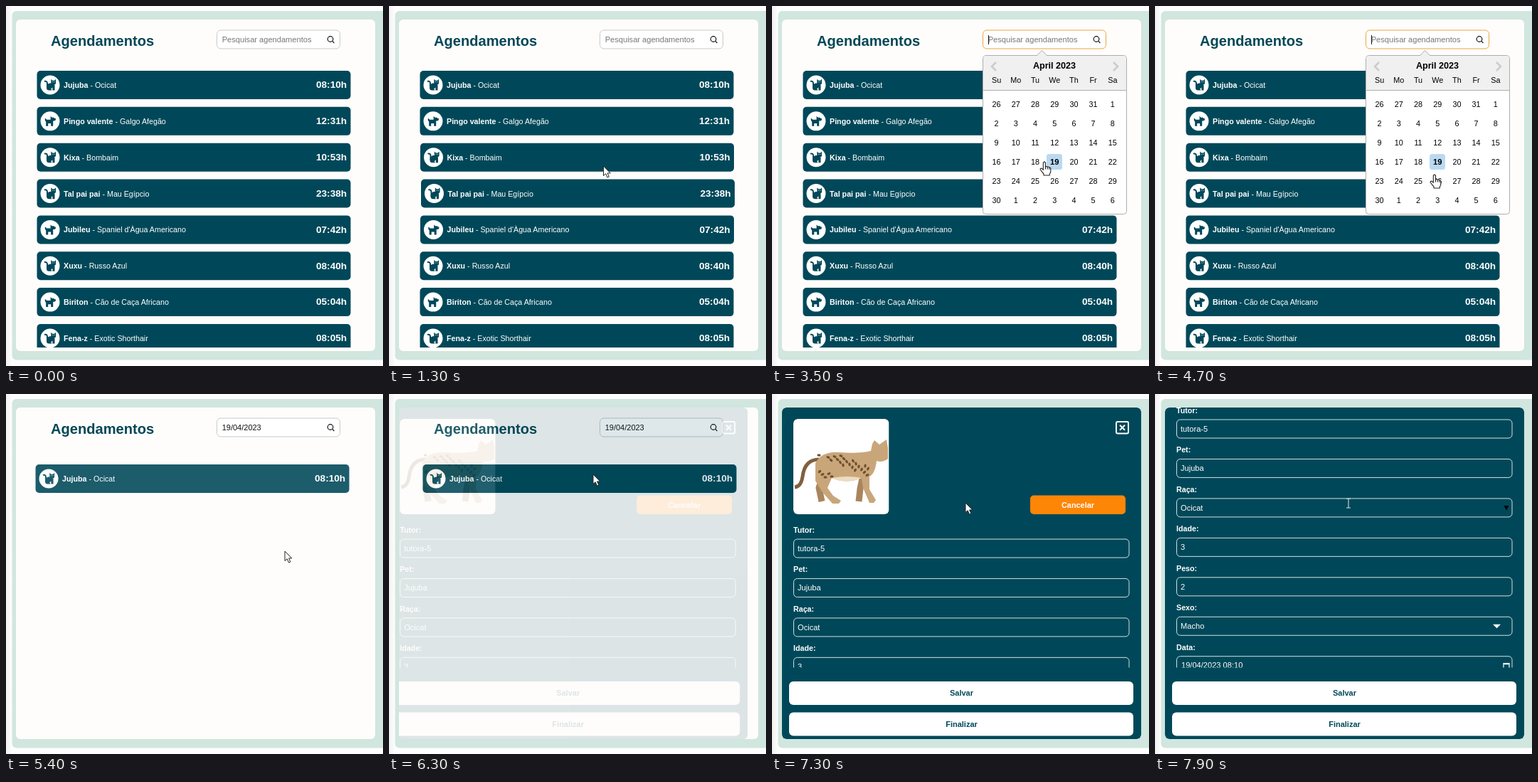
These frames come from a looping animation (530 by 506 pixels, 8000 ms). An HTML page:

```html
<!DOCTYPE html>
<html lang="pt">
<head>
<meta charset="utf-8">
<title>Agendamentos</title>
<style>
  html, body { margin: 0; width: 100%; height: 100%; overflow: hidden; background: #fefefe; }
  svg { display: block; width: 530px; height: 506px; font-family: "Liberation Sans", Arial, sans-serif; }
  .b { font-weight: bold; }
  .mid { text-anchor: middle; }
</style>
</head>
<body>
<svg id="stage" viewBox="0 0 530 506">
  <defs>
    <linearGradient id="edge">
      <stop offset="0" stop-color="#f1f1f1"/><stop offset="1" stop-color="#fdfdfd"/>
    </linearGradient>
    <clipPath id="panelClip"><rect x="14" y="19" width="505" height="466" rx="6"/></clipPath>
    <clipPath id="listClip"><rect x="14" y="70" width="505" height="410"/></clipPath>
    <clipPath id="formClip"><rect x="14" y="19" width="505" height="365.5"/></clipPath>
    <clipPath id="photoClip"><rect x="30" y="35" width="134.5" height="134" rx="6"/></clipPath>
    <g id="cat" fill="#004859">
      <path d="M-7.3-5.3Q-4-5.6-4-2V3" fill="none" stroke="#004859" stroke-width="2" stroke-linecap="round"/>
      <path d="M-5 4C-5-1.5-1-3.2 2.5-2.4L6.5 0V7.6H3.4V3.6L1 5.8Q2.3 6 2.3 7.6H-1.6Q-5 7.6-5 4Z"/>
      <path d="M1.3-8.3l2 2h2.8l2-2v5.4q0 2.7-3.4 2.7t-3.4-2.7z"/>
      <path d="M3.2-4.3h1M5.4-4.3h1" stroke="#fff" stroke-width=".9"/>
    </g>
    <path id="dog" fill="#004859" d="M-7.3-3.6q1.2-.5 1.6.6q.3 1 1.6 1H.6V-7l2 1.8h2.8l1 1.4h1.5v1.4q0 2-2.3 2H4.2V7H1.2V3.2H-2.8V7h-3V.8q-1.8-1-1.5-4.4z"/>
  </defs>

  <rect width="8" height="506" fill="url(#edge)"/>
  <rect x="8.500" y="7" width="540" height="490.500" rx="6" fill="#d0e6de"/>
  <rect x="14" y="19" width="505" height="466" rx="6" fill="#fefdfc"/>

  <text x="63" y="56" class="b" font-size="20.100" fill="#034756">Agendamentos</text>
  <rect id="box" x="296.500" y="34" width="173" height="26" rx="5.500" fill="#fff"/>
  <text id="query" x="303.700" y="51"/>
  <g fill="none" stroke="#111" stroke-width="1.200">
    <circle cx="456" cy="46.500" r="3.800"/><path d="M458.800 49.400l2.600 2.600"/>
  </g>
  <path id="caret" d="M304.500 41v13" stroke="#111"/>

  <g id="list" clip-path="url(#listClip)"></g>
  <g id="calendar"></g>

  <g clip-path="url(#panelClip)">
    <g id="modal">
      <rect x="14" y="19" width="505" height="466" rx="6" fill="#004859"/>
      <g clip-path="url(#formClip)"><g id="form"></g></g>
      <g id="actions"></g>
    </g>
  </g>

  <g id="cursor">
    <path id="arrow" d="M0 0V13.500L3.200 10.700L5.500 16L7.800 15L5.600 9.900H9.800Z" fill="#fff" stroke="#222" stroke-width="1"/>
    <path id="beam" d="M-3-6H-1Q0-6 0-5V6Q0 7-1 7H-3M3-6H1Q0-6 0-5M0 6Q0 7 1 7H3" fill="none" stroke="#333" stroke-width="1.100"/>
    <path id="hand" d="M-1.700 1.300Q0-1 1.500 1.300V7Q3 5.700 4.300 7.300Q5.800 6.300 6.800 8Q8.600 7.400 8.800 9.500V14Q8.200 16 7.300 17V19H-1V17Q-4 13.800-6 10.500Q-5.500 8.300-3.300 9.700L-1.700 11.300ZM1.500 7v3.500M4.300 7.500v3M6.800 8.300v2.500" fill="#fff" stroke="#222" stroke-width="1.100" stroke-linejoin="round"/>
  </g>
</svg>

<script>
const LOOP = 8000, STEP = 100;
const OPEN = 2500, PICK = 5100, MODAL = 6240, SCROLL = 7400;
const TEAL = '#004859', FADE = 500, SLIDE = 17;
const $ = id => document.getElementById(id);
const show = (el, on) => el.setAttribute('visibility', on ? 'visible' : 'hidden');

const text = (x, y, s, size, fill, cls = '') =>
  `<text x="${x}" y="${y}" font-size="${size}" fill="${fill}" class="${cls}">${s}</text>`;
const rect = (x, y, w, h, r, attrs) =>
  `<rect x="${x}" y="${y}" width="${w}" height="${h}" rx="${r}" ${attrs}/>`;

// Appointment list
const pets = [
  ['cat', 'Jujuba', 'Ocicat', '08:10h'],
  ['dog', 'Pingo valente', 'Galgo Afegão', '12:31h'],
  ['cat', 'Kixa', 'Bombaim', '10:53h'],
  ['cat', 'Tal pai pai', 'Mau Egípcio', '23:38h'],
  ['dog', 'Jubileu', "Spaniel d'Àgua Americano", '07:42h'],
  ['cat', 'Xuxu', 'Russo Azul', '08:40h'],
  ['dog', 'Biriton', 'Cão de Caça Africano', '05:04h'],
  ['cat', 'Fena-z', 'Exotic Shorthair', '08:05h']
];
const rowTop = (i, t) => t < PICK ? 91 + i * 50.85 : 99;

$('list').innerHTML = pets.map(([icon, name, breed, hour]) => `<g>
  ${rect(43.5, 0, 441, 40, 5, `fill="${TEAL}"`)}
  <circle cx="62" cy="20" r="13.500" fill="#fff"/>
  <use href="#${icon}" x="62" y="20"/>
  ${text(81, 24, `<tspan class="b">${name}</tspan> - ${breed}`, 10.7, '#fff')}
  ${text(436, 24.3, hour, 13.6, '#fff', 'b')}
</g>`).join('');
const rows = [...$('list').children];

// Date picker
const colX = c => 315.6 + c * 27.2;
function calendar() {
  let out = rect(296.5, 69.5, 202, 223, 4, 'fill="#fff" stroke="#aeaeae"') +
    '<path d="M297 118.500V73.500q0-3.500 3.500-3.500H494.500q3.500 0 3.500 3.500V118.500Z" fill="#f0f0f0"/>' +
    '<path d="M296.500 118.500H498.500" stroke="#aeaeae"/>' +
    '<path d="M372 70L379.500 62.500L387 70" fill="#f0f0f0" stroke="#aeaeae"/>' +
    '<path d="M315 79l-6 6l6 6M480 79l6 6l-6 6" fill="none" stroke="#ccc" stroke-width="2.600"/>' +
    text(397, 88, 'April 2023', 12.6, '#000', 'b mid');
  ['Su', 'Mo', 'Tu', 'We', 'Th', 'Fr', 'Sa'].forEach((d, c) => {
    out += text(colX(c), 108, d, 10.8, '#000', 'mid');
  });
  for (let n = 0; n < 42; n++) {
    const c = n % 7, y = 141.5 + Math.floor(n / 7) * 27.15;
    const day = n < 6 ? 26 + n : (n - 6) % 30 + 1;
    const picked = n === 24;
    if (picked) out += rect(386, 208, 22, 22, 3.5, 'fill="#bad9f1"');
    out += text(colX(c), y, day, picked ? 11.2 : 10.8, '#000', picked ? 'b mid' : 'mid');
  }
  return out;
}
$('calendar').innerHTML = calendar();

// Edit form
const fields = [
  ['Tutor', 'tutora-5'], ['Pet', 'Jujuba'], ['Raça', 'Ocicat'], ['Idade', '3'],
  ['Peso', '2'], ['Sexo', 'Macho'], ['Data', '19/04/2023 08:10']
];
const fieldTop = i => 204 + i * 55.45;

function photo() {
  const spots = Array.from({ length: 26 }, (_, i) => {
    const x = 66 + (i * 17) % 72, y = 86 + (i * 7) % 32;
    return `<ellipse cx="${x}" cy="${y}" rx="2.600" ry="1.700" transform="rotate(${i * 40} ${x} ${y})"/>`;
  }).join('');
  return `<g clip-path="url(#photoClip)">
    ${rect(30, 35, 134.5, 134, 6, 'fill="#fff"')}
    <path d="M66 92Q46 92 43 116Q41 130 32 131" fill="none" stroke="#80603f" stroke-width="5"/>
    <path d="M72 112L66 132L70 151M128 114L124 133L122 151" fill="none" stroke="#a9855d" stroke-width="9"/>
    <path d="M61 97Q70 80 95 82Q122 84 139 80L141 70L144 65L151 71L161 64L163 76V91Q155 97 147 94Q145 112 137 116V134L146 149L143 153H137L128 132L126 118Q105 127 84 118L78 132L86 143L97 150L94 154H85L70 137L61 122Z" fill="#c9a67a"/>
    <path d="M84 118Q105 127 126 118Q107 114 84 118Z" fill="#ecdcc0"/>
    <g fill="#70502f">${spots}</g>
  </g>`;
}

$('form').innerHTML = photo() +
  rect(484, 39, 17, 16.5, 2, 'fill="none" stroke="#fff" stroke-width="2"') +
  '<path d="M489 43.700l7 7m0-7l-7 7" stroke="#fff" stroke-width="2"/>' +
  rect(363, 142.5, 134, 26.5, 5, 'fill="#fe8607"') +
  text(430, 160, 'Cancelar', 10.9, '#fff', 'b mid') +
  fields.map(([label, value], i) => {
    const y = fieldTop(i);
    return text(30, y - 9, label + ':', 10.7, '#fff', 'b') +
      rect(30.5, y, 471.5, 26, 5, 'fill="none" stroke="#d3dfe2"') +
      text(i === 6 ? 37 : 36, y + 16.7, value, 11.1, '#fff');
  }).join('') +
  `<path d="M475 ${fieldTop(5) + 10.500}h11l-5.500 5.500z" fill="#fff"/>` +
  `<path d="M490 ${fieldTop(6) + 10}h8v9h-8zm0 1h8" fill="none" stroke="#fff" stroke-width="1.200"/>` +
  `<path id="drop" d="M490.500 ${fieldTop(2) + 10}h7l-3.500 6.500z" fill="#000"/>`;

$('actions').innerHTML = [['Salvar', 404], ['Finalizar', 447.5]].map(([s, y]) =>
  rect(24, y, 484, 33, 6, 'fill="#fff"') + text(266.5, y + 20, s, 11, TEAL, 'b mid')).join('');

// Motion
const clamp = v => Math.max(0, Math.min(1, v));
const smooth = v => v * v * (3 - 2 * v);

// CSS "ease" curve
function ease(v) {
  v = clamp(v);
  let lo = 0, hi = 1, p;
  for (let i = 0; i < 20; i++) {
    p = (lo + hi) / 2;
    const x = 0.75 * p * (1 - p) ** 2 + 0.75 * p * p * (1 - p) + p ** 3;
    if (x < v) lo = p; else hi = p;
  }
  return 0.3 * p * (1 - p) ** 2 + 3 * p * p * (1 - p) + p ** 3;
}

const path = [
  [700, 262, 432], [1100, 285, 300], [1500, 318, 150], [1900, 328, 50], [2500, 328, 50],
  [2950, 366, 158], [3500, 383, 219], [3700, 383, 219], [4000, 382, 216], [4200, 382, 216],
  [4500, 402, 241], [4700, 393, 237], [5000, 393, 221], [5400, 392, 221],
  [6000, 291, 118], [6300, 287, 113], [7000, 272, 153], [8000, 272, 153]
];
function pointer(t) {
  const k = path.findIndex(p => p[0] > t);
  if (k < 1) return null;
  const [t0, x0, y0] = path[k - 1], [t1, x1, y1] = path[k];
  const v = smooth((t - t0) / (t1 - t0));
  return [x0 + (x1 - x0) * v, y0 + (y1 - y0) * v];
}

function hovered(i, t) {
  const p = pointer(t);
  if (!p || (t >= OPEN && t < PICK)) return false;
  const y = p[1] - rowTop(i, t);
  return y >= 0 && y <= 40;
}
// Averaging the recent hover state gives the 200 ms transition
function nudge(i, t) {
  let n = 0;
  for (let k = 0; k < 8; k++) n += hovered(i, t - k * 25);
  return n / 2;
}

function draw(t) {
  const open = t >= OPEN && t < PICK, picked = t >= PICK;

  const query = $('query');
  query.textContent = picked ? '19/04/2023' : 'Pesquisar agendamentos';
  query.setAttribute('fill', picked ? '#111' : '#777');
  query.setAttribute('font-size', picked ? 11 : 11.1);
  $('box').setAttribute('stroke', open && t > OPEN ? '#eba53d' : '#c9c9c9');
  show($('caret'), open && (t - OPEN) % 1000 < 500);
  show($('calendar'), open);

  const enter = picked ? ease((t - PICK) / FADE) : 1;
  rows.forEach((row, i) => {
    show(row, !picked || i === 0);
    const x = nudge(i, t) - SLIDE * (1 - enter);
    row.setAttribute('transform', `translate(${x} ${rowTop(i, t)})`);
    row.setAttribute('opacity', enter);
  });

  const fade = ease((t - MODAL) / FADE);
  const scroll = 168 * smooth(clamp((t - SCROLL) / 500));
  $('modal').setAttribute('opacity', fade);
  $('modal').setAttribute('transform', `translate(${-SLIDE * (1 - fade)} 0)`);
  $('form').setAttribute('transform', `translate(0 ${-scroll})`);

  const p = pointer(t);
  show($('cursor'), p);
  const over = p && t >= SCROLL ? fields.findIndex((_, i) => {
    const y = p[1] + scroll - fieldTop(i);
    return y >= 0 && y <= 26;
  }) : -1;
  const shape = !p ? '' :
    over >= 0 || (t < PICK && p[1] < 62) ? 'beam' :
    open && p[1] > 120 ? 'hand' : 'arrow';
  ['arrow', 'beam', 'hand'].forEach(id => $(id).setAttribute('display', id === shape ? 'inline' : 'none'));
  $('beam').setAttribute('stroke', t > MODAL ? '#cfdadc' : '#333');
  $('drop').setAttribute('display', over === 2 ? 'inline' : 'none');
  if (p) $('cursor').setAttribute('transform', `translate(${p[0]} ${p[1]})`);
}

const start = performance.now();
function tick() {
  const t = (performance.now() - start) % LOOP;
  draw(Math.floor(t / STEP) * STEP);
  requestAnimationFrame(tick);
}
tick();
</script>
</body>
</html>
```
